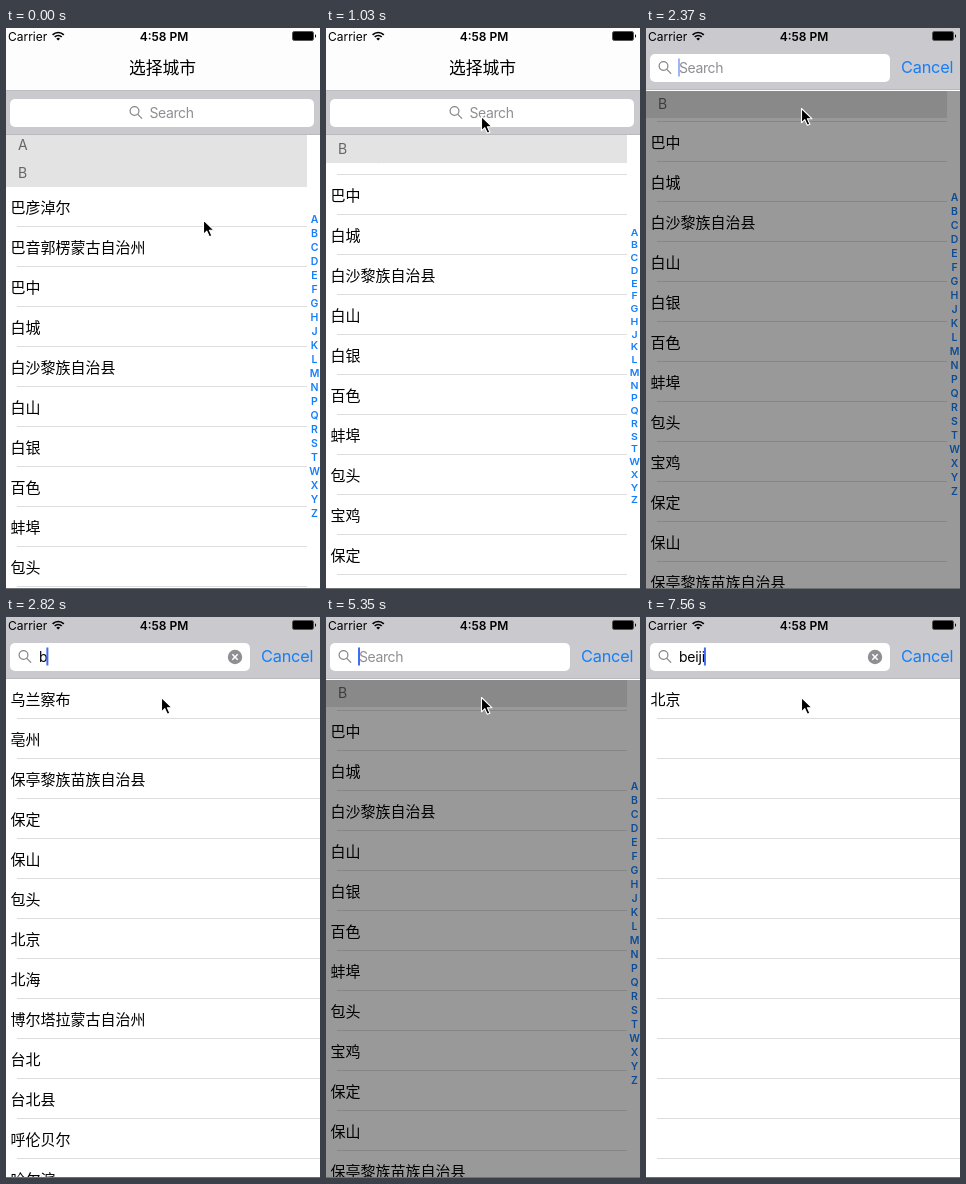
Write an HTML page that moves like this. It is 314 by 561 pixels and loops after 8000 ms.

```html
<!DOCTYPE html>
<html lang="zh-CN">
<head>
<meta charset="utf-8">
<title>选择城市</title>
<style>
  html, body { margin: 0; width: 100%; height: 100%; overflow: hidden; background: #fff; }
  svg { display: block; width: 314px; height: 561px; }
  text { font-family: Inter, "Liberation Sans", sans-serif; white-space: pre; }
  .cjk { font: 15px "Noto Sans CJK SC", "Noto Sans CJK", sans-serif; fill: #000; }
  .title { font-size: 16.8px; font-weight: 500; text-anchor: middle; }
  .status { font-size: 12px; }
  .clock { font-weight: 600; text-anchor: middle; }
  .head { font-size: 14px; fill: #666; }
  .index { font-size: 10.5px; font-weight: 600; fill: #147efb; text-anchor: middle; }
  .field { font-size: 14px; letter-spacing: -.2px; }
  .hint { letter-spacing: -.4px; fill: #8e8e93; }
  .cancel { font-size: 16.3px; letter-spacing: -.2px; fill: #147efb; }
</style>
</head>
<body>
<svg id="stage" viewBox="0 0 314 561">
  <rect width="314" height="561" fill="#fff"/>
  <g id="rows"></g>
  <g id="headA"><rect width="301" height="28" fill="#e3e3e3"/><text class="head" x="12" y="19">A</text></g>
  <g id="headB"><rect width="301" height="28" fill="#e3e3e3"/><text class="head" x="12" y="19">B</text></g>
  <g id="index"></g>
  <rect id="dim" width="314" height="561" fill="#000"/>
  <rect id="nav" width="314" height="63" fill="#fdfdfd"/>
  <text id="title" class="cjk title" x="156.5" y="46.3">选择城市</text>
  <rect id="bar" width="314" fill="#c9c9ce"/>
  <rect id="edgeTop" width="314" height="1" fill="#bcbcc1"/>
  <rect id="edgeBottom" width="314" height="1" fill="#b9b9be"/>
  <g id="search">
    <rect id="box" x="4" y="8" height="28" rx="5" fill="#fff"/>
    <g id="lens" fill="none" stroke="#85858a" stroke-width="1.2" stroke-linecap="round">
      <circle cx="5" cy="20" r="4.4"/><path d="M8.3 23.3L12.3 27.3"/>
    </g>
    <text id="hint" class="field hint" y="27">Search</text>
    <text id="typed" class="field" x="33" y="27"></text>
    <rect id="caret" y="12.5" width="2" height="18" fill="#426bf2"/>
    <g id="clear">
      <circle cx="229" cy="22" r="7.2" fill="#8e8e93"/>
      <path d="M226.3 19.3l5.4 5.4m0-5.4l-5.4 5.4" stroke="#fff" stroke-width="1.5"/>
    </g>
    <text id="cancel" class="cancel" y="27.3">Cancel</text>
  </g>
  <g id="results"></g>
  <g>
    <text class="status" x="2" y="12.5">Carrier</text>
    <text class="status clock" x="158" y="12.5">4:58 PM</text>
    <g fill="none" stroke="#000" stroke-width="1.7">
      <path d="M46.6 6.8a8 8 0 0 1 11.2 0M48.7 9a5 5 0 0 1 7 0"/>
      <path d="M52.2 12.6L50.3 10.7a2.7 2.7 0 0 1 3.8 0z" fill="#000" stroke="none"/>
    </g>
    <rect x="286.5" y="3.5" width="21" height="9" rx="1.8" fill="#000" stroke="#555"/>
    <path d="M309 6.2a2.2 2.2 0 0 1 0 3.8z"/>
  </g>
  <rect y="560" width="314" height="1" fill="#707070"/>
  <path id="pointer" d="M0 0V14.3L3.3 11.2L5.8 16.8L8.4 15.7L5.9 10.2H10.4Z"
        fill="#000" stroke="#fff" stroke-width="1.1" stroke-linejoin="round"/>
</svg>
<script>
const LOOP = 8000;
const $ = id => document.getElementById(id);
const cities = ('巴彦淖尔 巴音郭楞蒙古自治州 巴中 白城 白沙黎族自治县 白山 白银 百色 蚌埠 包头 ' +
  '宝鸡 保定 保山 保亭黎族苗族自治县').split(' ');
const found = {
  b: '乌兰察布 亳州 保亭黎族苗族自治县 保定 保山 包头 北京 北海 博尔塔拉蒙古自治州 台北 台北县 呼伦贝尔 哈尔滨',
  bj: '北京 宝鸡 毕节地区',
  be: '北京 北海 台北 台北县 呼伦贝尔 本溪 淮北',
  bei: '北京 北海 台北 台北县 呼伦贝尔 淮北',
  beij: '北京',
  beiji: '北京'
};

// Tables of [start time, value]
const typing = [[0, ''], [2820, 'b'], [3270, 'bj'], [4760, 'b'], [5350, ''],
  [5800, 'b'], [5950, 'be'], [6100, 'bei'], [6390, 'beij'], [6530, 'beiji']];
const blink = [[0, 0], [1330, 1], [1780, .5], [1920, 0], [2070, 1], [2370, .5], [2520, 0],
  [2820, 1], [3860, .5], [4010, 0], [4310, 1], [6970, .5], [7120, 0], [7560, 1]];
const opening = [[0, 0], [1180, .22], [1330, 1]];
const listShift = [[0, 0], [1180, 11], [1330, 50], [1480, 53]];
const squeeze = [[0, 1], [1030, .911], [1330, 1]];
const ticks = [0, 140, 290, 440, 590, 740, 890, 1030].map(t => [t, t]);

const at = (table, t) => table.reduce((v, [start, value]) => t >= start ? value : v, table[0][1]);
const mix = (a, b, k) => a + (b - a) * k;
const set = (id, attrs) => { for (const k in attrs) $(id).setAttribute(k, attrs[k]); };
const move = (id, x, y) => set(id, { transform: `translate(${x} ${y})` });
const line = (y, right) => `<rect x="11" y="${y}" width="${right - 11}" height="1" fill="#dedee0"/>`;
const row = (name, i, right) =>
  `<text class="cjk" x="4.5" y="${i * 40 + 25.7}">${name}</text>` + line(i * 40 + 39, right);

$('rows').innerHTML = cities.map((c, i) => row(c, i, 301)).join('');
$('index').innerHTML = [...'ABCDEFGHJKLMNPQRSTWXYZ']
  .map((c, i) => `<text class="index" x="308.5" y="${i * 14 - 147 + 3.9}">${c}</text>`).join('');

let shown = '';
function showResults(text) {
  if (text === shown) return;
  shown = text;
  const names = text ? found[text].split(' ') : [];
  const rows = Array.from({ length: 13 }, (_, i) => row(names[i] || '', i, 314)).join('');
  $('results').innerHTML = text ? `<rect width="314" height="498" fill="#fff"/>${rows}` : '';
}

function draw(t) {
  const p = at(opening, t), shift = at(listShift, t), text = at(typing, t);
  const tick = at(ticks, t);
  const scroll = 92 * (1 - (1 - tick / 1030) ** 3);
  const k = Math.min(tick / 890, 1), glide = k * k * (3 - 2 * k);
  const barTop = mix(63, 18, p), listTop = barTop + 44;

  const first = 159 - scroll - shift;
  const headB = Math.max(listTop, first - 28);
  move('rows', 0, first);
  move('headB', 0, headB);
  move('headA', 0, Math.min(listTop, headB - 28));
  set('index', { transform: `translate(0 ${mix(338, 316, p)}) scale(1 ${at(squeeze, t)})` });

  set('dim', { y: listTop, opacity: .4 * p });
  set('title', { opacity: 1 - p });
  const grayTop = p < 1 ? barTop : 0;
  set('bar', { y: grayTop, height: listTop - grayTop });
  set('edgeTop', { y: barTop - 1, opacity: p < 1 ? 1 : 0 });
  set('edgeBottom', { y: listTop - 1 });

  move('search', 0, barTop);
  set('box', { width: mix(304, 240, p) });
  move('lens', mix(123.5, 12.5, p), 0);
  set('hint', { x: mix(143.5, 33, p), opacity: text ? 0 : 1 });
  set('cancel', { x: mix(314, 255, p), opacity: p });
  set('clear', { opacity: text ? 1 : 0 });

  $('typed').textContent = text;
  const width = text ? $('typed').getComputedTextLength() : 0;
  set('caret', { x: 32 + width, opacity: at(blink, t) });
  move('results', 0, 62);
  showResults(text);

  const px = mix(197.5, 155.5, glide);
  const py = t < 1630 ? mix(192, 88.5, glide) : 80.5;
  move('pointer', px, py);
}

const start = performance.now();
function frame(now) {
  draw(Math.max(0, now - start) % LOOP);
  requestAnimationFrame(frame);
}
draw(0);
requestAnimationFrame(frame);
</script>
</body>
</html>
```
